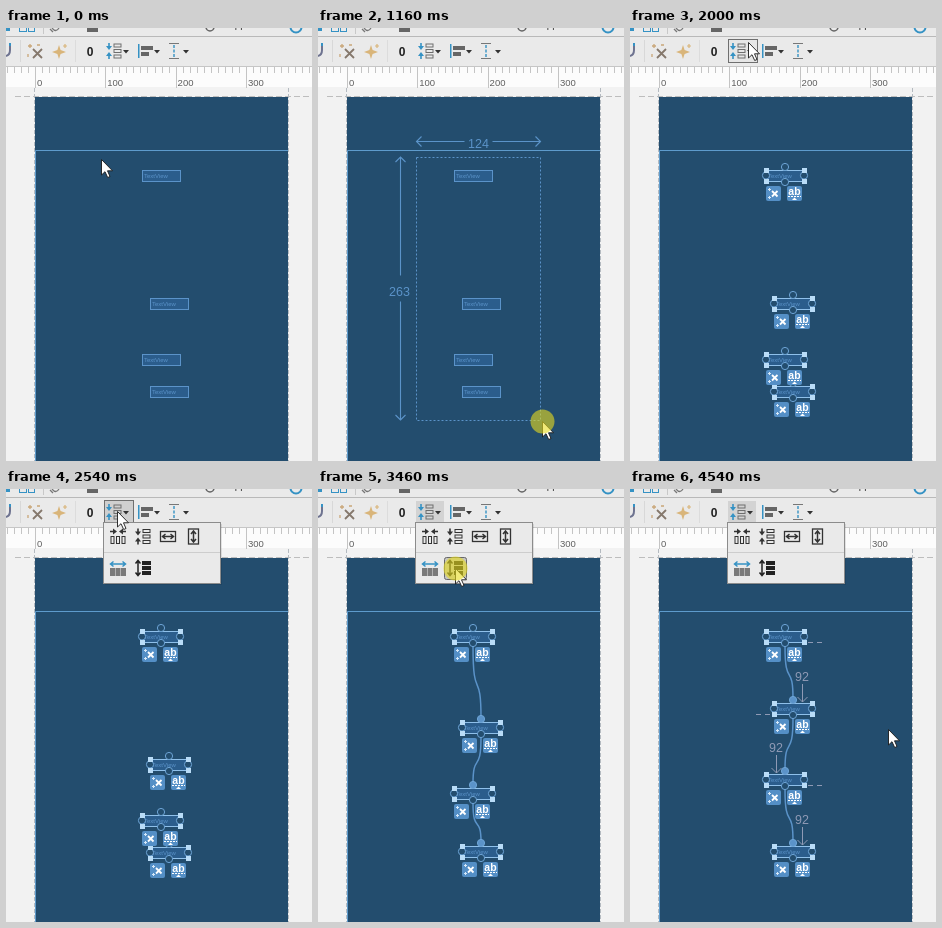
Animation, 306 px wide and 433 px high, one loop 4690 ms. Source, as an HTML page:

```html
<!DOCTYPE html>
<html lang="en">
<head>
<meta charset="utf-8">
<title>Distribute vertically</title>
<style>
html, body { margin: 0; width: 100%; height: 100%; overflow: hidden; background: #f2f2f2; }
svg { display: block; width: 306px; height: 433px; }
text { font-family: "Liberation Sans", Arial, sans-serif; }
</style>
</head>
<body>
<svg id="stage" viewBox="0 0 306 433">
  <g id="base"></g><g id="scene"></g>
</svg>
<script>
const LOOP = 4690, TICKS = 61;
const BLUE = '#5b93c9', PALE = '#8fc0ea', DARK = '#333', SKY = '#3592c4', MUTED = '#8f9ab5';

const rect = (x, y, w, h, fill, extra = '') =>
  `<rect x="${x}" y="${y}" width="${w}" height="${h}" fill="${fill}" ${extra}/>`;
const box = (x, y, w, h, stroke, fill = 'none', extra = '') =>
  rect(x + .5, y + .5, w - 1, h - 1, fill, `stroke="${stroke}" ${extra}`);
const line = (d, stroke, width = 1, extra = '') =>
  `<path d="${d}" fill="none" stroke="${stroke}" stroke-width="${width}" ${extra}/>`;
const fill = (d, color) => `<path d="${d}" fill="${color}"/>`;
const ring = (x, y, r, color, width = 1.5) =>
  `<circle cx="${x}" cy="${y}" r="${r}" fill="none" stroke="${color}" stroke-width="${width}"/>`;
const text = (x, y, s, size, color, extra = '') =>
  `<text x="${x}" y="${y}" font-size="${size}" fill="${color}" ${extra}>${s}</text>`;
const mid = 'text-anchor="middle"';
const at = (x, y, s) => `<g transform="translate(${x} ${y})">${s}</g>`;
const turn = s => `<g transform="rotate(90)">${s}</g>`;
const flip = s => `<g transform="matrix(0 1 1 0 0 0)">${s}</g>`;
const caret = x => fill(`M${x - 3} 22h6l-3 3.5z`, DARK);

// Toolbar glyphs, centred on 0,0
const arrowH = (c, r) => line(`M${-r} 0H${r}M${3 - r} -2.5L${-r} 0L${3 - r} 2.5M${r - 3} -2.5L${r} 0L${r - 3} 2.5`, c, 1.5);
const pack = (arrow, bar) => [-7.5, -2, 3.5].map(y => box(-.5, y, 8, 4, bar)).join('') +
  line('M-5 -8v4M-5 8v-4', arrow, 1.6) + fill('M-8 -5h6l-3 4zM-8 5h6l-3 -4z', arrow);
const expandH = box(-8, -5.5, 16, 11, DARK, 'none', 'stroke-width="1.3"') + arrowH(DARK, 5.5);
const spreadH = at(0, -4, arrowH(SKY, 7.5)) +
  [-8, -2.5, 3].map(x => rect(x, 0, 5, 8, '#7a7a7a')).join('');
const spreadV = at(-5, 0, turn(arrowH('#222', 7.5))) +
  [-7, -2, 3].map(y => rect(-1, y, 9, 4, '#222')).join('');

function drawBase() {
  let s = rect(0, 0, 306, 38, '#eaeaea') + rect(0, 8, 306, 1, '#b9b9b9');

  // Lower edge of the upper toolbar
  s += rect(0, 0, 4, 3, SKY) + box(13, -5, 8, 9, SKY) + box(22, -5, 7, 9, SKY) +
    rect(37, 0, 1, 6, '#c8c8c8') + line('M44 1L47 4M46 0q4 5 7 0', '#777', 1.3) +
    rect(81, 0, 11, 4, '#666') + ring(204, -1, 4, '#666') +
    text(222, 0, 'App', 10, DARK) + ring(290, -1, 5.5, SKY, 2);

  // Main toolbar
  s += line('M0 28Q4 27 4 22V16', '#6e7390', 2) + rect(3, 15, 2, 3, SKY) +
    rect(14, 12, 1, 22, '#d8d8d8') + rect(69, 12, 1, 22, '#dcdcdc');
  s += at(29, 23, line('M-2 -2L7 7M7 -2L-2 7', '#85786c', 1.8) +
    line('M-5 -7v4M-7 -5h4M2 -6h3M-7 3v3', '#c9a678', 1.3));
  s += at(53, 23, fill('M0 -6L1.6 -1L7 1L1.6 3L0 8L-1.6 3L-7 1L-1.6 -1z', '#d9b57a') +
    line('M6 -7v4M4 -5h4', '#d9b57a', 1.2));
  s += text(84, 27.5, '0', 12, '#222', mid + ' font-weight="bold"');
  s += at(140, 23, rect(-8, -7, 1.5, 14, SKY) + rect(-5, -5, 12, 4, '#666') + rect(-5, 1, 8, 4, '#666')) + caret(151);
  s += at(168, 23, line('M-5 -7.5h10M-5 7.5h10', '#777', 1.2) + line('M0 -6V6', SKY, 1.4, 'stroke-dasharray="3 1.5"')) + caret(180);
  s += rect(0, 38, 306, 1, '#c6c6c6');

  // Ruler
  s += rect(0, 39, 306, 20, '#fcfcfc') + rect(0, 59, 306, 374, '#f2f2f2');
  for (let i = -4; i < 40; i++) {
    const major = i >= 0 && i % 10 === 0;
    s += rect(Math.round(29 + i * 7.03), 39, 1, major ? 21 : 6, '#c4c4c4');
  }
  [0, 100, 200, 300].forEach((v, i) => s += text(31 + i * 70.3, 58, v, 9.5, '#5d5d5d'));

  // Blueprint sheet
  s += line('M9 68.5H306', '#bdbdbd', 1, 'stroke-dasharray="6 3"');
  s += rect(29, 69, 253, 364, '#234d6e');
  s += line('M28.5 60V433M282.5 60V433', '#b4bac0', 1, 'stroke-dasharray="4 2"');
  s += line('M282 122.5H29.5V433', '#5e9bcc');
  return s;
}

// tick, x, y of the pointer tip
const path = [
  [1, 95, 131], [4, 99, 130], [5, 99, 130], [6, 103, 137], [7, 124, 190], [8, 149, 249],
  [9, 171, 296], [10, 189, 332], [11, 203, 359], [12, 213, 378], [13, 219, 387], [14, 223, 392],
  [15, 224, 393], [16, 224, 393], [18, 205, 315], [20, 172, 190], [22, 142, 77], [23, 132, 43],
  [24, 125, 27], [26, 118, 14], [28, 108, 14], [32, 108, 14], [34, 114, 30], [36, 130, 62],
  [38, 147, 89], [39, 148, 90], [42, 137, 79], [51, 137, 79], [52, 138, 80], [54, 165, 112],
  [56, 222, 200], [58, 253, 236], [59, 258, 240]
];
const lerp = (a, b, p) => a + (b - a) * p;
const within = (n, a, b) => n >= a && n <= b;

function tip(n) {
  const i = path.findIndex(k => k[0] >= n);
  if (i === 0) return path[0].slice(1);
  if (i < 0) return path[path.length - 1].slice(1);
  const a = path[i - 1], b = path[i], p = (n - a[0]) / (b[0] - a[0]);
  return [Math.round(lerp(a[1], b[1], p)), Math.round(lerp(a[2], b[2], p))];
}

// x, first y and distributed y of each label
const boxes = [[136, 142, 142], [144, 270, 214], [136, 326, 285], [144, 358, 357]];

function actions(x, y) {
  const round = 'rx="2"';
  return rect(x, y, 15, 15, '#548fc6', round) + rect(x + 21, y, 15, 15, '#548fc6', round) +
    line(`M${x + 6} ${y + 5}l5.5 5.5m0 -5.5l-5.5 5.5`, '#fff', 1.8) +
    line(`M${x + 3.5} ${y + 2}v3m-1.5 -1.5h3M${x + 3.5} ${y + 10}v3m-1.5 -1.5h3`, '#d6e8f8') +
    text(x + 28.5, y + 8.5, 'ab', 10.5, '#fff', mid + ' font-weight="bold"') +
    line(`M${x + 22} ${y + 10.5}h13`, '#fff', 1, 'stroke-dasharray="2 1"') +
    fill(`M${x + 26} ${y + 14}h5l-2.5 -2.5z`, '#fff');
}

function widget(x, y, selected, linked) {
  let s = box(x, y, 39, 12, selected ? PALE : BLUE, '#2b5d8c') +
    text(x + 2, y + 8, 'TextView', 6, BLUE);
  if (!selected) return s;
  const dot = (cx, cy, on) =>
    `<circle cx="${cx}" cy="${cy}" r="3.6" fill="${on ? BLUE : '#234d6e'}" stroke="#6ea5d7"/>`;
  s += dot(x + 19, y - 3, linked) + dot(x + 19, y + 12) + dot(x, y + 5.5) + dot(x + 38, y + 5.5);
  for (const cx of [x - 2, x + 36]) for (const cy of [y - 2, y + 9]) s += rect(cx, cy, 5, 5, '#b9dcf7');
  return s + actions(x, y + 16);
}

function marquee(x, y) {
  const w = Math.min(x - 99, 124), h = y - 130;
  const span = (len, gap) => {
    const half = len / 2, c = Math.min(5, half);
    return line(`M0 0H${Math.max(0, half - gap)}M${Math.min(len, half + gap)} 0H${len}` +
      `M${c} -5L0 0L${c} 5M${len - c} -5L${len} 0L${len - c} 5`, BLUE, 1.1);
  };
  return box(98, 129, w + 1, h + 1, BLUE, 'none', 'stroke-dasharray="2 2"') +
    at(98.5, 113.5, span(w, w > 99 ? 14 : 10)) + text(98.5 + w / 2, 120, w, 12.5, BLUE, mid) +
    at(82.5, 129, turn(span(h, 13))) + text(81.5, 136.5 + h / 2, h, 12.5, BLUE, mid);
}

function layout(n) {
  const selected = n >= 17, linked = n >= 44;
  const p = Math.min(1, Math.max(0, (n - 43) / 3));
  const pos = boxes.map(([x, a, b]) => [x, Math.round(lerp(a, b, p))]);
  let s = '';
  if (linked) for (let i = 1; i < 4; i++) {
    const [ax, ay] = pos[i - 1], [bx, by] = pos[i];
    const x1 = ax + 19, x2 = bx + 19, y1 = ay + 15, y2 = by - 4;
    s += line(`M${x1} ${y1}C${x1} ${lerp(y1, y2, .8)} ${x2} ${lerp(y1, y2, .3)} ${x2} ${y2}`, BLUE, 1.5);
  }
  // Upper widgets lie over lower ones
  for (let i = 3; i >= 0; i--) s += widget(...pos[i], selected, linked && i > 0);
  if (n >= 46) {
    const dash = (x, y) => line(`M${x} ${y + .5}h15`, MUTED, 1, 'stroke-dasharray="5 4"');
    s += dash(178, 153);
    if (n >= 47) s += dash(126, 225) + dash(178, 296);
    [[172, 214], [146, 285], [172, 357]].forEach(([x, y]) => {
      s += line(`M${x + .5} ${y - 19}V${y - 1}m-5 -5l5 5l5 -5`, MUTED);
      if (n >= 47) s += text(x, y - 22.5, 92, 12.5, MUTED, mid);
    });
  }
  return s;
}

function popup(x, y) {
  let s = rect(99, 35, 117, 61, '#000', 'opacity=".1"') + box(97, 33, 118, 62, '#8c8c8c', '#eaeaea') +
    rect(98, 63, 116, 1, '#cdcdcd');
  if (within(x, 125, 149) && within(y, 68, 92)) s += box(126, 68, 23, 23, '#686868', '#c3c3c3', 'rx="2"');
  return s + at(112, 47.5, flip(pack(DARK, DARK))) + at(137, 47.5, pack(DARK, DARK)) +
    at(162, 47.5, expandH) + at(187.5, 47.5, turn(expandH)) + at(112, 79, spreadH) + at(137, 79, spreadV);
}

const arrow = '<path d="M.5 .5V16L4 12.7L6.7 18.5L9 17.5L6.5 11.8H11.5Z" fill="#fff" stroke="#1a1a1a" stroke-width=".9"/>';

function drawScene(n) {
  const [x, y] = tip(n), open = n >= 29;
  let s = layout(n);
  if (within(n, 6, 16)) s += marquee(x, y);

  const hover = within(x, 98, 127) && within(y, 11, 35);
  if (hover) s += box(98, 11, 30, 24, '#6f6f6f', open ? '#cfcfcf' : '#e6e6e6');
  else if (open) s += rect(98, 12, 28, 23, '#d3d3d3');
  s += at(108, 23, pack(SKY, '#6e6e6e')) + caret(120);

  if (open) s += popup(x, y);
  if (within(n, 41, 43)) s += line('M273 73l3 3l-3 3l3 5M276 72v12M276 76l4 -2M276 79h4', '#1c2a36', 1.1);
  s += at(x, y, arrow);
  if (within(n, 6, 16) || within(n, 28, 30) || within(n, 43, 45))
    s += `<circle cx="${x + .5}" cy="${y + .5}" r="12" fill="#e8dc1e" opacity=".6"/>`;
  return s;
}

document.getElementById('base').innerHTML = drawBase();
const scene = document.getElementById('scene');
const start = performance.now();
let shown = -1;

function frame(now) {
  const time = Math.max(0, now - start) % LOOP;
  const n = Math.min(TICKS - 1, Math.floor(time / LOOP * TICKS + .2));
  if (n !== shown) scene.innerHTML = drawScene(shown = n);
  requestAnimationFrame(frame);
}
frame(start);
</script>
</body>
</html>
```
